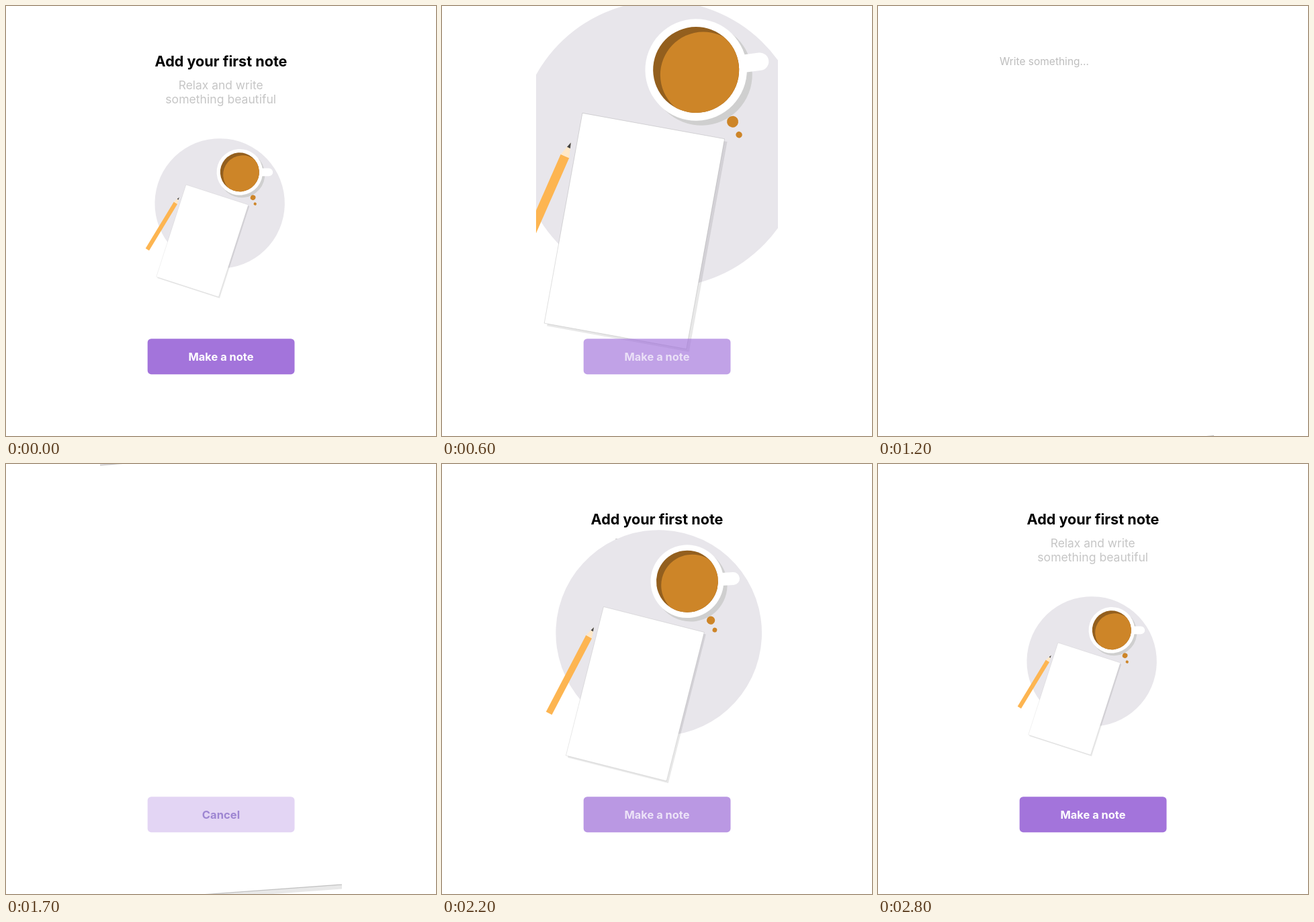
Recreate the animation shown at these times as an HTML page with a canvas. Size 640 by 640 pixels, loop 3900 ms.

```html
<!DOCTYPE html>
<html lang="en">
<head>
<meta charset="utf-8">
<title>Add a note</title>
<style>
  html, body { margin: 0; width: 100%; height: 100%; overflow: hidden; background: #fff; }
  canvas { display: block; width: 640px; height: 640px; }
</style>
</head>
<body>
<canvas id="stage" width="640" height="640"></canvas>
<script>
const ctx = document.getElementById('stage').getContext('2d');
const LOOP = 3900;
const PURPLE = '#a374db';
const FONT = 'Poppins, Inter, sans-serif';

const clamp = x => Math.min(1, Math.max(0, x));
const ramp = (t, from, to) => clamp((t - from) / (to - from));
const between = (t, from, to) => t >= from && t < to;

// cubic-bezier(.25, .1, .25, 1), solved by bisection
function ease(x) {
  if (x <= 0 || x >= 1) return clamp(x);
  const bezier = (u, a, b) => 3 * (1 - u) ** 2 * u * a + 3 * (1 - u) * u * u * b + u ** 3;
  let lo = 0, hi = 1;
  for (let i = 0; i < 24; i++) {
    const mid = (lo + hi) / 2;
    if (bezier(mid, .25, .25) < x) lo = mid; else hi = mid;
  }
  return bezier(lo, .1, 1);
}

function disc(x, y, r, color) {
  ctx.fillStyle = color;
  ctx.beginPath();
  ctx.arc(x, y, r, 0, Math.PI * 2);
  ctx.fill();
}

function polygon(color, ...points) {
  ctx.fillStyle = color;
  ctx.beginPath();
  points.forEach(([x, y]) => ctx.lineTo(x, y));
  ctx.fill();
}

function label(text, x, y, size, weight, color, align = 'center') {
  ctx.font = `${weight} ${size}px ${FONT}`;
  ctx.textAlign = align;
  ctx.fillStyle = color;
  ctx.fillText(text, x, y);
}

function button(text, fill, color, alpha, size) {
  if (alpha <= 0) return;
  ctx.save();
  ctx.globalAlpha = alpha;
  ctx.fillStyle = fill;
  ctx.beginPath();
  ctx.roundRect(210.7, 495.2, 218.8, 53, 5.5);
  ctx.fill();
  label(text, 320, 527.5, size, 700, color);
  ctx.restore();
}

function cup() {
  ctx.save();
  ctx.translate(21.5, -114.4);
  disc(4.1, 2.5, 34.3, '#cfcfcf');
  disc(0, 0, 34.3, '#fff');

  ctx.save();
  ctx.rotate(-17.7 * Math.PI / 180);
  ctx.strokeStyle = '#fff';
  ctx.lineWidth = 11.9;
  ctx.lineCap = 'round';
  ctx.beginPath();
  ctx.moveTo(25, 0);
  ctx.lineTo(43.4, 0);
  ctx.stroke();
  ctx.restore();

  disc(0, 0, 29, '#935f1e');
  ctx.beginPath();
  ctx.arc(0, 0, 29, 0, Math.PI * 2);
  ctx.clip();
  disc(5.4, 2.5, 29, '#cd8528');
  ctx.restore();
}

function pencil() {
  ctx.save();
  ctx.translate(-52.8, -51.1);
  ctx.rotate(13.4 * Math.PI / 180);
  polygon('#fdb551', [-3.1, 10], [3.1, 10], [3.1, 91], [-3.1, 91]);
  polygon('#ffe8c8', [0, 0], [3.1, 10], [-3.1, 10]);
  polygon('#444', [0, 0], [1.2, 3.8], [-1.2, 3.8]);
  ctx.restore();
}

function paper() {
  ctx.fillStyle = 'rgba(0,0,0,.09)';
  ctx.fillRect(-46.6, -70.5, 97.4, 144);
  ctx.fillStyle = '#fff';
  ctx.fillRect(-48.7, -72, 97.4, 144);
  ctx.strokeStyle = 'rgba(0,0,0,.2)';
  ctx.lineWidth = .28;
  ctx.strokeRect(-48.7, -72, 97.4, 144);
}

// The whole desk is rigid; its origin is the centre of the paper.
function desk(zoom) {
  const u = 3.77 * zoom;
  ctx.save();
  ctx.translate(292.2 - 11.6 * u + 5.6 * u * u, 349.5 - 13 * u + .8 * u * u);
  ctx.rotate((17.9 - 6.3 * u) * Math.PI / 180);
  ctx.scale(1 + u, 1 + u);
  disc(7.6, -60.9, 96.7, '#e8e6eb');
  cup();
  disc(52, -84.4, 3.85, '#cd8528');
  disc(57.8, -76.5, 2.15, '#cd8528');
  pencil();
  paper();
  ctx.restore();
}

function draw(t) {
  const zoom = t < 1300
    ? 1 - ease(1 - ramp(t, 45, 967))
    : 1 - ease(ramp(t, 1610, 2690));

  ctx.fillStyle = '#fff';
  ctx.fillRect(0, 0, 640, 640);
  ctx.save();
  ctx.beginPath();
  ctx.rect(140, 0, 360, 640);
  ctx.clip();

  label('Add your first note', 320, 90, 21.6, 700, '#000');
  label('Relax and write', 319.7, 124, 17.4, 400, '#c6c6c6');
  label('something beautiful', 319.7, 145, 17.6, 400, '#c6c6c6');
  desk(zoom);

  if (between(t, 1190, 1600)) {
    label('Write something...', 181, 87.5, 15.5, 400, '#bdbdbd', 'left');
  }
  if (t >= 1390) {
    button('Cancel', '#e3d5f4', '#9e86d2', 1 - ramp(t, 1900, 2230), 16.6);
  }
  const makeAlpha = t < 1300 ? 1 - ramp(t, 500, 800) : ramp(t, 1980, 2280);
  button('Make a note', PURPLE, '#fff', makeAlpha, 16.4);
  ctx.restore();
}

let start;
function tick(now) {
  start ??= now;
  draw((now - start) % LOOP);
  requestAnimationFrame(tick);
}
draw(0);
requestAnimationFrame(tick);
</script>
</body>
</html>
```
